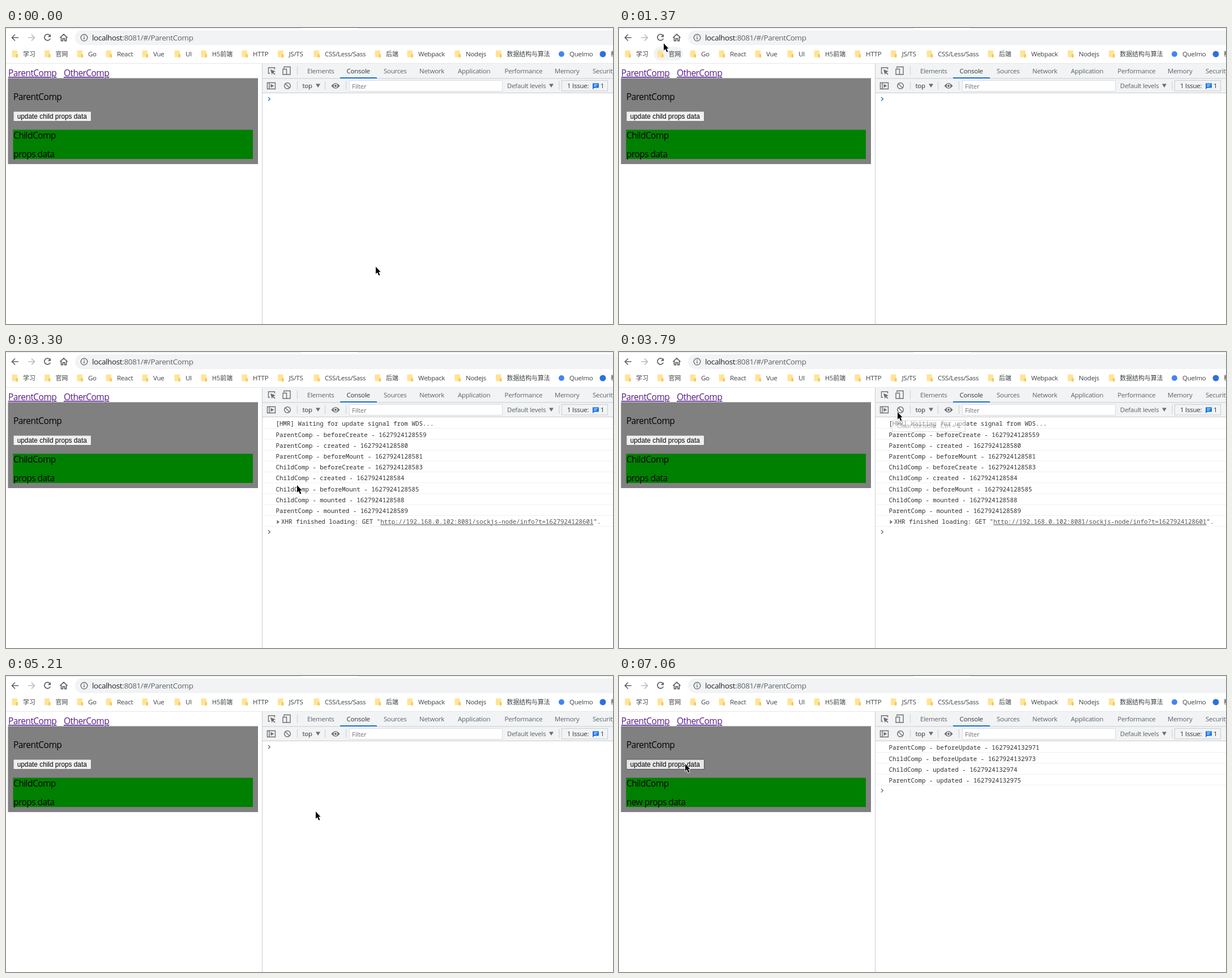
An HTML page for the animation above (7.99 s loop, 1072 px wide and 522 px high).

```html
<!DOCTYPE html>
<html lang="en">
<head>
<meta charset="utf-8">
<title>Component lifecycle</title>
<style>
html, body { margin: 0; width: 100%; height: 100%; overflow: hidden; background: #fff; }
svg { display: block; width: 1072px; height: 522px; }
text { white-space: pre; }
.ui { font: 11.5px "Open Sans", "Noto Sans", sans-serif; letter-spacing: -.25px; }
.cjk { font: 10.9px "Open Sans", "Noto Sans CJK SC", "Noto Sans CJK", sans-serif; }
.url { font: 13.5px "Open Sans", "Noto Sans", sans-serif; letter-spacing: -.37px; }
.page { font: 15.5px "Open Sans", "Noto Sans", sans-serif; letter-spacing: -.55px; }
.button { font: 11.85px "Liberation Sans", Arial, sans-serif; }
.log { font: 10.82px "Noto Sans Mono", monospace; }
.icon { fill: none; stroke: #5f6368; stroke-width: 1.7; }
.tool { fill: none; stroke: #6e6e6e; stroke-width: 1.4; }
</style>
</head>
<body>
<svg id="stage" viewBox="0 0 1072 522"></svg>
<script>
const LOOP = 7990;
const FRAME = 70;

// Pointer waypoints: time, x, y
const PATH = [
  [50, 653, 421], [400, 470, 308], [600, 339, 227], [740, 277, 165], [880, 239, 131],
  [950, 237, 129], [1370, 79, 27], [1510, 72, 14], [1700, 72, 14],
  [1770, 80, 20], [2200, 491, 171], [2540, 547, 271], [2680, 549, 277], [2870, 549, 277],
  [2940, 545, 272], [3300, 514, 235], [3720, 492, 106], [4870, 492, 106],
  [5210, 547, 239], [5340, 547, 239], [5410, 518, 231], [5620, 316, 197],
  [5710, 218, 180], [5830, 157, 165], [6040, 117, 156], [6580, 117, 156], [6590, 117, 155]
];

const LOAD_LOG = [
  "[HMR] Waiting for update signal from WDS...",
  "ParentComp - beforeCreate - 1627924128559",
  "ParentComp - created - 1627924128580",
  "ParentComp - beforeMount - 1627924128581",
  "ChildComp - beforeCreate - 1627924128583",
  "ChildComp - created - 1627924128584",
  "ChildComp - beforeMount - 1627924128585",
  "ChildComp - mounted - 1627924128588",
  "ParentComp - mounted - 1627924128589",
  'XHR finished loading: GET "<tspan fill="#545454" text-decoration="underline">http://192.168.0.102:8081/sockjs-node/info?t=1627924128601</tspan>".'
];
const UPDATE_LOG = [
  "ParentComp - beforeUpdate - 1627924132971",
  "ChildComp - beforeUpdate - 1627924132973",
  "ChildComp - updated - 1627924132974",
  "ParentComp - updated - 1627924132975"
];

const text = (cls, x, y, str, fill = "#000", more = "") =>
  `<text class="${cls}" x="${x}" y="${y}" fill="${fill}" ${more}>${str}</text>`;
const rect = (x, y, w, h, fill, more = "") =>
  `<rect x="${x}" y="${y}" width="${w}" height="${h}" fill="${fill}" ${more}/>`;
const path = (cls, d, more = "") => `<path class="${cls}" d="${d}" ${more}/>`;
const dot = (x, y, r, fill, more = "") => `<circle cx="${x}" cy="${y}" r="${r}" fill="${fill}" ${more}/>`;
const group = (id, body, more = "") => `<g id="${id}" ${more}>${body}</g>`;

function browserBar() {
  const folders = [
    [10, "学习"], [67.5, "官网"], [125, "Go"], [176, "React"], [240, "Vue"], [297, "UI"],
    [344, "H5前端"], [416, "HTTP"], [479.5, "JS/TS"], [543, "CSS/Less/Sass"], [651, "后端"],
    [708, "Webpack"], [792, "Nodejs"], [864.5, "数据结构与算法"]
  ];
  const label = (x, s) => text(/[^\x00-\x7f]/.test(s) ? "cjk" : "ui", x, 50, s, "#3c4043");
  const folder = ([x, name]) =>
    rect(x + .5, 39.5, 9.5, 12, "#ffe496", 'rx="1"') +
    rect(x + 7.5, 46, 3.5, 6, "#f4c95a", 'rx="1"') + label(x + 20, name);
  return rect(0, 0, 521, 1, "#e3e6ea") + rect(621, 0, 451, 1, "#e3e6ea") +
    rect(122, 4, 980, 26, "#f1f3f4", 'rx="13"') +
    path("icon", "M22 17H11M16 11.5L10.5 17L16 22.5") +
    path("icon", "M39 17H50M45 11.5L50.5 17L45 22.5", 'style="stroke:#babcbe"') +
    group("reload", path("icon", "M77.6 13.2A5.4 5.4 0 1 0 78.3 18.5") +
      '<path d="M79 10.8V16H73.8Z" fill="#5f6368"/>') +
    group("stop", path("icon", "M68.3 12.3L77.8 21.8M77.8 12.3L68.3 21.8")) +
    path("icon", "M95.5 17.2L102 11L108.5 17.2M97.5 16V22.7H100.4V18.6H103.6V22.7H106.5V16") +
    dot(138, 17, 5.8, "none", 'stroke="#5f6368" stroke-width="1.3"') +
    rect(137.3, 16, 1.4, 4.2, "#5f6368") + rect(137.3, 13.3, 1.4, 1.5, "#5f6368") +
    text("url", 152, 21.5, 'localhost<tspan fill="#5f6368">:8081/#/ParentComp</tspan>', "#202124") +
    group("pill", rect(61, 33, 52, 24, "#f1f3f4", 'rx="12"')) +
    folders.map(folder).join("") +
    dot(981, 46, 5, "#4285f4") + label(995, "Quelmo") +
    dot(1054, 46, 5.5, "#2f6fe0") + label(1068, "松") +
    rect(0, 62, 1072, 1, "#e4e6e8");
}

function page() {
  const link = (x, s) => text("page", x, 85, s, "#551a8b", 'text-decoration="underline"');
  return link(4, "ParentComp") + link(102, "OtherComp") +
    rect(3.5, 88.5, 441.5, 151.5, "#808080") +
    text("page", 13, 127, "ParentComp") +
    `<rect id="button" x="13" y="147" width="137.5" height="17.5" rx="1.5"/>` +
    text("button", 19.7, 160, "update child props data") +
    rect(12.5, 179.5, 423.5, 51.5, "#008000") +
    text("page", 13, 195, "ChildComp") +
    text("page", 13, 228, "", "#000", 'id="props"');
}

function devtools() {
  const tabs = [[532, "Elements"], [601.5, "Console"], [667, "Sources"], [730, "Network"],
    [798, "Application"], [880.5, "Performance"], [969, "Memory"], [1036, "Security"]];
  const line = "#cacdd1";
  const bar = (x, y) => rect(x, y, 1, 15, line);
  const drop = x => `<path d="M${x} 98.5h8l-4 6.5z" fill="#6e6e6e"/>`;
  return rect(453, 63, 619, 52, "#f1f3f4") + rect(452, 63, 1, 459, line) +
    rect(453, 88.5, 619, 1, line) + rect(453, 114, 619, 1, line) +
    rect(590, 87, 65, 2, "#1a73e8") +
    tabs.map(([x, s]) => text("ui", x, 80.3, s, s === "Console" ? "#333" : "#5f6368")).join("") +
    path("tool", "M466 80H463.5V70H474.5V73") +
    '<path d="M467 73L476 76.6L472.4 78L475.6 81.4L474.3 82.6L471 79.3L469.6 82.4Z" fill="#6e6e6e"/>' +
    path("tool", "M491 71V68.5H502V82H496M489 72.5H495.5V82H489Z") +
    bar(514, 68) + bar(514, 94) + bar(563, 94) + bar(600, 94) + bar(976.5, 94) +
    path("tool", "M461.5 96.5H475.5V107.5H461.5ZM465 96.5V107.5") +
    '<path d="M467.5 98.7L473.3 102L467.5 105.3Z" fill="#6e6e6e"/>' +
    dot(497, 102, 5.3, "none", 'stroke="#6e6e6e" stroke-width="1.5"') +
    path("tool", "M493.3 98.3L500.7 105.7") +
    text("ui", 523.5, 106, "top", "#333") + drop(547) +
    '<path d="M574.5 102Q582 92.5 589.5 102Q582 111.5 574.5 102Z" fill="#6e6e6e"/>' +
    dot(582, 102, 3.4, "#f1f3f4") + dot(582, 102, 2, "#6e6e6e") +
    rect(606.5, 92.5, 270, 19, "#fff", 'stroke="#dadce0"') +
    text("ui", 611, 107, "Filter", "#757575") +
    text("ui", 885, 106, "Default levels", "#5f6368") + drop(959) +
    group("issue", rect(981.5, 92.5, 81, 18.5, "#f1f3f4", `stroke="${line}"`) +
      text("ui", 991, 106, "1 Issue:", "#333") +
      '<path d="M1036 97.5H1047V105.5H1039L1036 108.2Z" fill="#1a73e8"/>' +
      rect(1038.2, 99.5, 6.6, 1, "#fff") + rect(1038.2, 102, 4.6, 1, "#fff") +
      text("ui", 1050, 106, "1", "#333"));
}

const ROW = 19.2;
function logRows(id, lines) {
  return group(id, lines.map((s, i) => {
    const xhr = s.startsWith("XHR"), y = 130.4 + ROW * i;
    return group(`${id}${i}`, text("log", xhr ? 486 : 476.5, y, s, "#303030") +
      (xhr ? `<path d="M478.5 ${y - 7}v7l4.5 -3.5z" fill="#6e6e6e"/>` : "") +
      rect(453, 134.2 + ROW * i, 619, 1, "#f0f0f0"));
  }).join(""));
}

function overlays() {
  return group("tip", rect(482.5, 120.5, 129, 20, "#fff", 'stroke="#bdbdbd"') +
      text("ui", 490.5, 134.3, "Clear console   Ctrl + L", "#575757")) +
    group("halo", dot(0, 0, 11, "#f8e71c", 'opacity=".72"')) +
    group("arrow", '<path d="M0 0V12.8L2.9 10.1L5.3 15.6L7.4 14.6L5.1 9.3H8.6Z" fill="#000" stroke="#fff" stroke-width="1.6" paint-order="stroke" stroke-linejoin="round"/>') +
    group("hand", '<path d="M1 1.2Q2.7 -.8 4 1.2V6.6L6 6.9L8.3 7.5L10.6 8.7V13.5L9 16.7V19.3H0V17L-3.8 11.5Q-4.2 9.3 -2 9.8L1 12Z" fill="#fff" stroke="#000" stroke-width="1.1"/><path d="M4 6.6V10M6.6 7V10.4M8.8 8V11" stroke="#000" stroke-width=".8"/>');
}

document.getElementById("stage").innerHTML =
  browserBar() + page() + devtools() + logRows("load", LOAD_LOG) + logRows("update", UPDATE_LOG) +
  '<path id="prompt" d="M463 122L466.3 125.2L463 128.4" fill="none" stroke-width="1.5"/>' + overlays();

const $ = id => document.getElementById(id);
const show = (id, on) => $(id).setAttribute("visibility", on ? "visible" : "hidden");
const place = (id, x, y) => $(id).setAttribute("transform", `translate(${x} ${y})`);
const within = (t, a, b) => t >= a && t < b;

function pointerAt(t) {
  const i = PATH.findIndex(p => p[0] > t);
  if (i === 0) return PATH[0].slice(1);
  if (i < 0) return PATH[PATH.length - 1].slice(1);
  const [ta, xa, ya] = PATH[i - 1], [tb, xb, yb] = PATH[i];
  const step = Math.floor((t - ta) / FRAME) * FRAME;
  const k = step / (tb - ta);
  return [xa + (xb - xa) * k, ya + (yb - ya) * k].map(Math.round);
}

function tipOpacity(t) {
  if (within(t, 3790, 3860)) return .5;
  if (within(t, 3860, 4730)) return 1;
  return within(t, 4730, 4800) ? .2 : 0;
}

function draw(t) {
  const [x, y] = pointerAt(t);
  const hand = within(t, 4130, 4870);
  show("arrow", !hand);
  show("hand", hand);
  place("arrow", x, y);
  place("hand", x - 2, 104);

  const click = within(t, 1570, 1700) || within(t, 4730, 4870) || within(t, 6860, 7060);
  show("halo", click);
  place("halo", x + 1, y);

  show("pill", within(t, 1230, 1440));
  const loading = within(t, 1840, 2680);
  show("reload", !loading);
  show("stop", loading);
  show("issue", !within(t, 1840, 2050));

  const loaded = t < 2050 || t >= 4870 ? 0 : t < 2940 ? 1 : LOAD_LOG.length;
  LOAD_LOG.forEach((_, i) => show(`load${i}`, i < loaded));
  const updated = t >= 6930;
  show("update", updated);
  const rows = loaded || (updated ? UPDATE_LOG.length : 0);
  place("prompt", 0, rows * ROW);
  $("prompt").setAttribute("stroke", t < 2940 ? "#367cd6" : "#7a7a7a");
  $("tip").setAttribute("opacity", tipOpacity(t));

  const hover = t >= 6000;
  $("button").setAttribute("fill", hover && !within(t, 6860, 6930) ? "#e5e5e5" : hover ? "#f5f5f5" : "#efefef");
  $("button").setAttribute("stroke", hover ? "#4f4f4f" : "#767676");
  $("props").textContent = updated ? "new props data" : "props data";
}

const start = performance.now();
function tick() {
  draw((performance.now() - start) % LOOP);
  requestAnimationFrame(tick);
}
tick();
</script>
</body>
</html>
```
